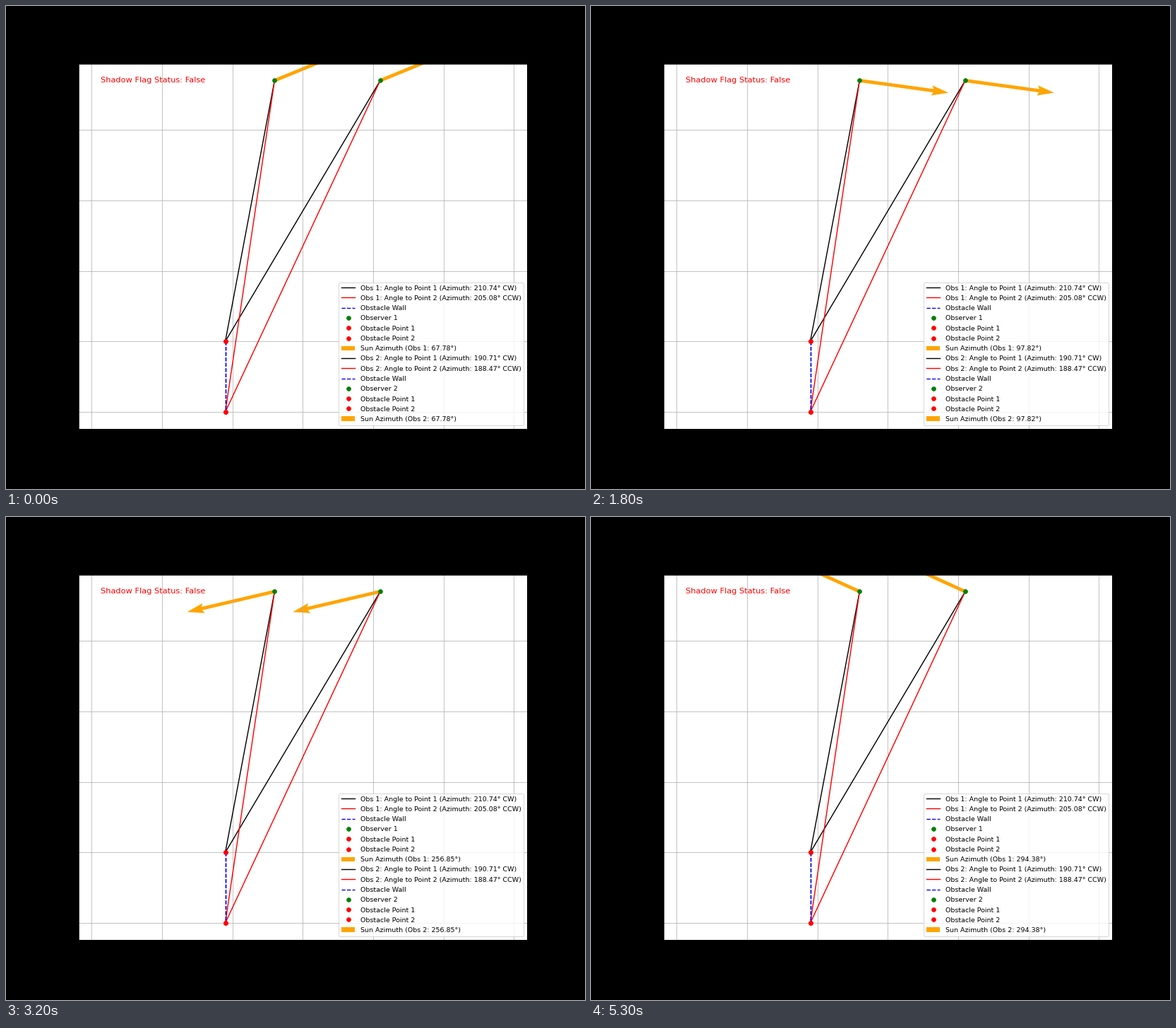
A matplotlib script that plays this animation: 820 px wide and 683 px high, repeating every 5.4 s.

```python
import numpy as np
import matplotlib.pyplot as plt
from matplotlib.animation import FuncAnimation

W, H = 820, 683
DPI = W / 12
FRAMES, INTERVAL = 54, 100

LATITUDE = np.radians(28.447)
START_HOUR_ANGLE = -96.956   # degrees, at the first step
HOUR_STEP = 3.75             # a quarter of an hour per step
LEGEND_HEIGHT = 202.15       # pixels

WALL = [(1.9, 1.0), (1.9, 0.0)]
OBSERVERS = [(4.1, 4.7), (2.6, 4.7)]

plt.rcParams.update({"font.family": "DejaVu Sans", "font.size": 10})


def sun_azimuth(step):
    """Solar azimuth in degrees clockwise from north."""
    hour = np.radians(START_HOUR_ANGLE + HOUR_STEP * step)
    decl = np.radians(21.5815 - 0.001645 * step)
    east = -np.sin(hour)
    north = np.tan(decl) * np.cos(LATITUDE) - np.sin(LATITUDE) * np.cos(hour)
    return np.degrees(np.arctan2(east, north)) % 360


def bearing(start, end):
    dx, dy = end[0] - start[0], end[1] - start[1]
    return np.degrees(np.arctan2(dx, dy)) % 360


def sun_label(number, azimuth):
    return f"Sun Azimuth (Obs {number}: {azimuth:.2f}°)"


def draw_observer(ax, number, pos):
    """Plot one observer with its sight lines and return its sun arrow."""
    sights = zip(WALL, ("k", "r"), ("CW", "CCW"))
    for i, (point, color, turn) in enumerate(sights, 1):
        ax.plot(*zip(pos, point), color=color, lw=1.5,
                label=f"Obs {number}: Angle to Point {i} "
                      f"(Azimuth: {bearing(pos, point):.2f}° {turn})")
    ax.plot(*zip(*WALL), "b--", lw=1.5, label="Obstacle Wall")
    ax.plot(*pos, "go", label=f"Observer {number}")
    for i, point in enumerate(WALL, 1):
        ax.plot(*point, "ro", label=f"Obstacle Point {i}")
    return ax.quiver(*pos, 0, 1, color="orange", scale=5,
                     label=sun_label(number, sun_azimuth(0)))


def add_legend(fig, ax, artists):
    """Legend whose row gap is chosen to give the wanted total height."""
    def build(gap):
        return ax.legend(handles=artists, loc="lower right", labelspacing=gap)

    gap = 0.5
    legend = build(gap)
    fig.canvas.draw()
    missing = LEGEND_HEIGHT - legend.get_window_extent().height
    font_px = 10 * DPI / 72
    return build(gap + missing / (7 * 2 - 1) / font_px)


fig = plt.figure(figsize=(W / DPI, H / DPI), dpi=DPI, facecolor="black")
ax = fig.add_axes([0.125, 0.125, 0.775, 0.755])

# Equal scale on both axes, centred on the scene with a 5 % margin in height
half_h = 4.7 * 1.1 / 2
half_w = half_h * (0.775 * W) / (0.755 * H)
ax.set_xlim(3.0 - half_w, 3.0 + half_w)
ax.set_ylim(2.35 - half_h, 2.35 + half_h)
ax.set_xticks(range(7))
ax.set_yticks(range(5))
ax.tick_params(labelbottom=False, labelleft=False)
ax.grid(True)

arrows, artists = [], []
for number, pos in enumerate(OBSERVERS, 1):
    first_line = len(ax.lines)
    arrows.append(draw_observer(ax, number, pos))
    artists += [*ax.lines[first_line:], arrows[-1]]

ax.text(0.05, 0.95, "Shadow Flag Status: False", color="red", fontsize=12,
        transform=ax.transAxes)
legend = add_legend(fig, ax, artists)
sun_texts = legend.get_texts()[6::7]


def update(step):
    azimuth = sun_azimuth(step)
    angle = np.radians(azimuth)
    for number, (arrow, text) in enumerate(zip(arrows, sun_texts), 1):
        arrow.set_UVC(np.sin(angle), np.cos(angle))
        text.set_text(sun_label(number, azimuth))
    return [*arrows, *sun_texts]


anim = FuncAnimation(fig, update, frames=FRAMES, interval=INTERVAL,
                     init_func=lambda: update(0), repeat=True)
plt.show()
```
